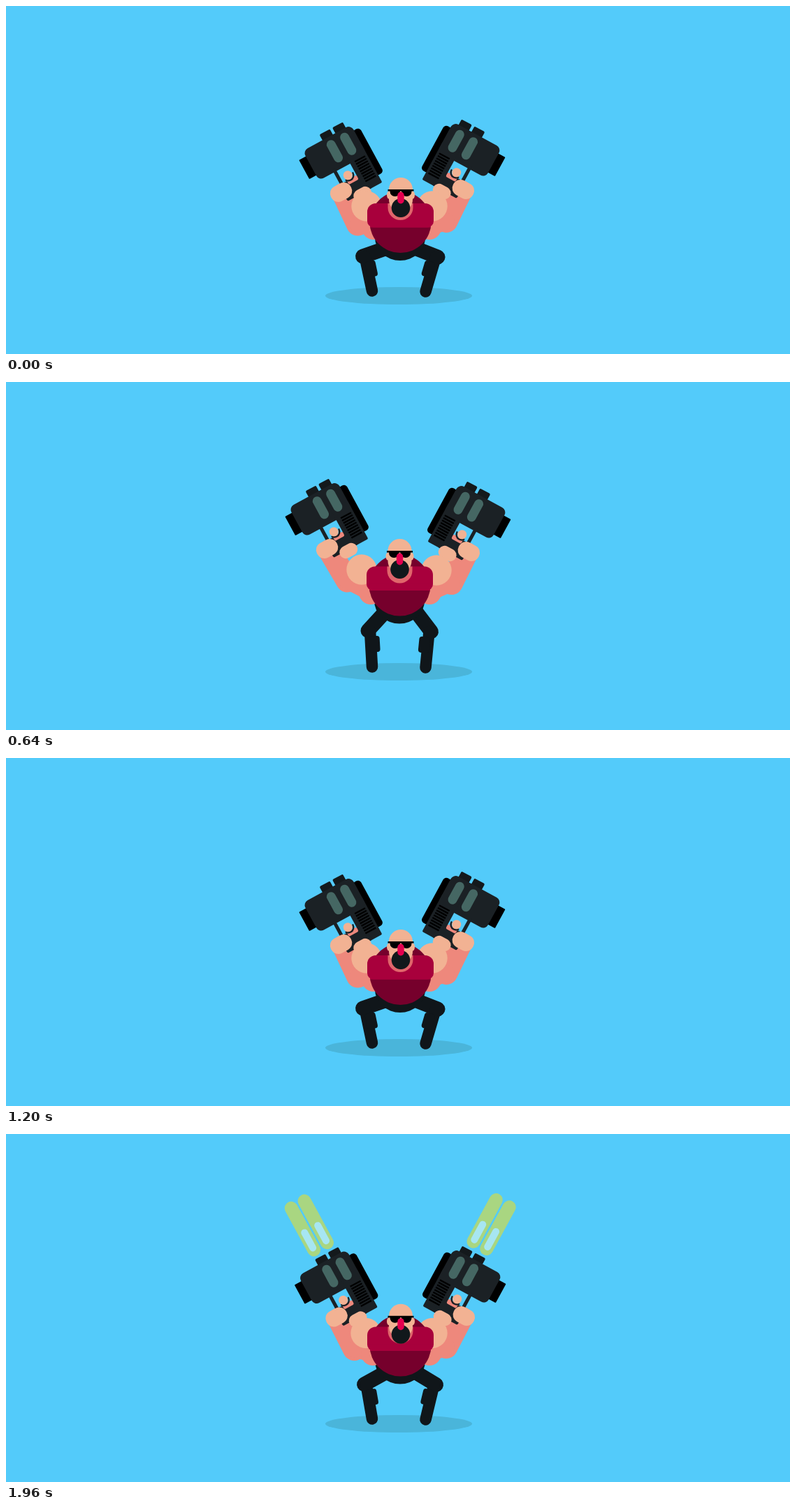
An HTML page with a canvas for the animation above (2000 ms loop, 1122 by 499 pixels).

```html
<!DOCTYPE html>
<html lang="en">
<head>
<meta charset="utf-8">
<title>Blaster guy</title>
<style>
html, body { margin: 0; width: 100%; height: 100%; overflow: hidden; background: #53cbfa; }
canvas { display: block; }
</style>
</head>
<body>
<canvas id="stage" width="1122" height="499"></canvas>
<script>
const ctx = document.getElementById('stage').getContext('2d');
const STEP = 40, CYCLE = 10, TILT = 28.5 * Math.PI / 180;
const C = {
  sky: '#53cbfa', shadow: '#4ab5da', pants: '#10161a', skin: '#f2b293', arm: '#ee887c',
  shirt: '#a8003c', shirtDark: '#76002c', neck: '#e0666b', nose: '#e4004f', beard: '#11181b',
  gun: '#1b2125', knob: '#14191c', glass: '#456763', beam: '#a9d681', core: '#a7e6f2', black: '#000'
};

// Resting point, its shift one step into the cycle, and its shift at four steps.
const joints = {
  head: [565, 246, 0, -2.3, -1.5, -21],
  torso: [564.5, 310, 0, -6.5, -1, -18.5],
  gunL: [470.3, 208, -6.5, -4.5, -20, -28],
  gunR: [663.6, 204, 1, -2, 8, -20],
  elbowL: [503.5, 313, -5, -4.5, -15, -28],
  elbowR: [630, 308.5, 0, -3, 7.5, -20],
  armL: [526, 318, -1, -3, -4, -16],
  armR: [606, 318, 0, -3, 0, -16],
  shoulderL: [516, 287, -1, -1.5, -7, -18],
  shoulderR: [610, 287, 0, -1.5, 6, -17],
  kneeL: [510.5, 359, 2, 0, 7.5, -2.5],
  kneeR: [618, 360, -2.5, -0.5, -9.5, -2],
  hipL: [545, 347, 0, -6, 0, -20],
  hipR: [585, 347, 0, -6, 0, -20]
};

const ease = k => (1 - Math.cos(k * Math.PI / 5)) / 2;
const bounce = k => Math.sin(k * Math.PI / 10);
const E1 = ease(1) / ease(4), B1 = bounce(1) / bounce(4);

// Mixes a soft ease and a sharper bounce so that both given shifts are met.
function shift(k, first, fourth) {
  const b = (first - E1 * fourth) / (B1 - E1);
  return (fourth - b) * ease(k) / ease(4) + b * bounce(k) / bounce(4);
}

function poseAt(k) {
  const pose = {};
  for (const [name, [x, y, x1, y1, x4, y4]] of Object.entries(joints)) {
    pose[name] = [x + shift(k, x1, x4), y + shift(k, y1, y4)];
  }
  return pose;
}

function box(x, y, w, h, r, color) {
  ctx.fillStyle = color;
  ctx.beginPath();
  ctx.roundRect(x, y, w, h, r);
  ctx.fill();
}

function oval(x, y, rx, ry, color) {
  ctx.fillStyle = color;
  ctx.beginPath();
  ctx.ellipse(x, y, rx, ry, 0, 0, Math.PI * 2);
  ctx.fill();
}

function limb(a, b, width, color) {
  ctx.strokeStyle = color;
  ctx.lineWidth = width;
  ctx.lineCap = 'round';
  ctx.beginPath();
  ctx.moveTo(...a);
  ctx.lineTo(...b);
  ctx.stroke();
}

function leg(hip, knee, foot, side) {
  const top = [knee[0] + side * 3, knee[1]];
  limb(hip, knee, 21, C.pants);
  limb(top, foot, 16.5, C.pants);
  ctx.save();
  ctx.translate(...top);
  ctx.rotate(Math.atan2(foot[1] - top[1], foot[0] - top[0]) - Math.PI / 2);
  ctx.scale(side, 1);
  box(-2, 8, 15, 23, 4, C.pants);
  ctx.restore();
}

// Drawn for the left hand; side -1 mirrors it.
function gun(at, side, firing) {
  ctx.save();
  ctx.translate(...at);
  ctx.scale(side, 1);
  ctx.rotate(-TILT);

  if (firing) {
    for (const x of [-2.5, 19]) {
      box(x - 9.5, -121.5, 19, 87, 9.5, C.beam);
      box(x - 5, -77, 10, 35, 5, C.core);
    }
  }
  box(35, -13, 12.5, 73, 5, C.black);
  box(-51, -13, 15, 31, 1, C.black);
  box(-8, -31, 17, 14, 2, C.knob);
  box(13, -31, 17, 14, 2, C.knob);
  box(-40, -22, 78.5, 48.5, 8, C.gun);
  box(11, 10, 27.5, 62, 2, C.gun);
  box(-16, 22, 5, 38, 1, C.gun);
  box(-18, 46, 40, 26, 2, C.gun);
  for (const x of [0, 22]) box(x - 6.5, -17, 13, 34.5, 6.5, C.glass);
  for (let i = 0; i < 9; i++) box(18, 26 + i * 4, 17, 2.4, 0, C.black);

  // trigger and finger
  box(-5, 45, 16, 7, 2, C.arm);
  ctx.strokeStyle = C.gun;
  ctx.lineWidth = 2.4;
  ctx.beginPath();
  ctx.arc(0.5, 40, 7.5, 0, Math.PI * 0.8);
  ctx.stroke();
  oval(0, 39.5, 6.5, 6.5, C.skin);

  box(-36, 44.5, 32, 23.5, 11, C.skin);
  box(-8, 64.5, 27, 18, 9, C.skin);
  ctx.restore();
}

function forearm(hold, side, elbow, upper) {
  limb([hold[0] + side * 13, hold[1] + 62], elbow, 33, C.arm);
  limb(elbow, upper, 24, C.arm);
  oval(...upper, 17, 17, C.arm);
}

function torso([x, y]) {
  oval(x, y, 44, 44, C.shirtDark);
  box(x - 47.5, y - 27, 95, 34.5, [12, 12, 9, 9], C.shirt);
  box(x - 43.5, y - 2, 87, 9.5, 0, C.shirt);
  box(x - 18, y - 27, 36, 24, [0, 0, 18, 18], C.neck);
}

function head([x, y]) {
  oval(x - 17, y + 25, 3, 5.5, C.skin);
  oval(x + 17, y + 25, 3, 5.5, C.skin);
  box(x - 17, y, 34, 49, 17, C.skin);
  box(x - 18.5, y + 17, 37, 2.6, 0, C.black);
  box(x - 15.5, y + 18, 14.5, 9, [0, 0, 7, 7], C.black);
  box(x + 1, y + 18, 14.5, 9, [0, 0, 7, 7], C.black);
  oval(x, y + 43.5, 13.3, 13.5, C.beard);
  box(x - 4.7, y + 20.5, 9.4, 17, 4.7, C.nose);
}

function draw(k) {
  const p = poseAt(k), firing = k % 2 === 1;
  ctx.fillStyle = C.sky;
  ctx.fillRect(0, 0, 1122, 499);
  oval(562, 415.5, 105, 12.5, C.shadow);

  leg(p.hipL, p.kneeL, [524, 408.5], 1);
  leg(p.hipR, p.kneeR, [600.5, 409.5], -1);
  oval(p.torso[0] - 0.5, p.torso[1] + 22, 36, 33, C.pants);

  forearm(p.gunL, 1, p.elbowL, p.armL);
  forearm(p.gunR, -1, p.elbowR, p.armR);
  gun(p.gunL, 1, firing);
  gun(p.gunR, -1, firing);
  oval(...p.shoulderL, 21.7, 21.7, C.skin);
  oval(...p.shoulderR, 21.7, 21.7, C.skin);

  torso(p.torso);
  head(p.head);
}

const start = performance.now();
function tick() {
  draw(Math.floor((performance.now() - start) / STEP) % CYCLE);
  requestAnimationFrame(tick);
}
tick();
</script>
</body>
</html>
```
